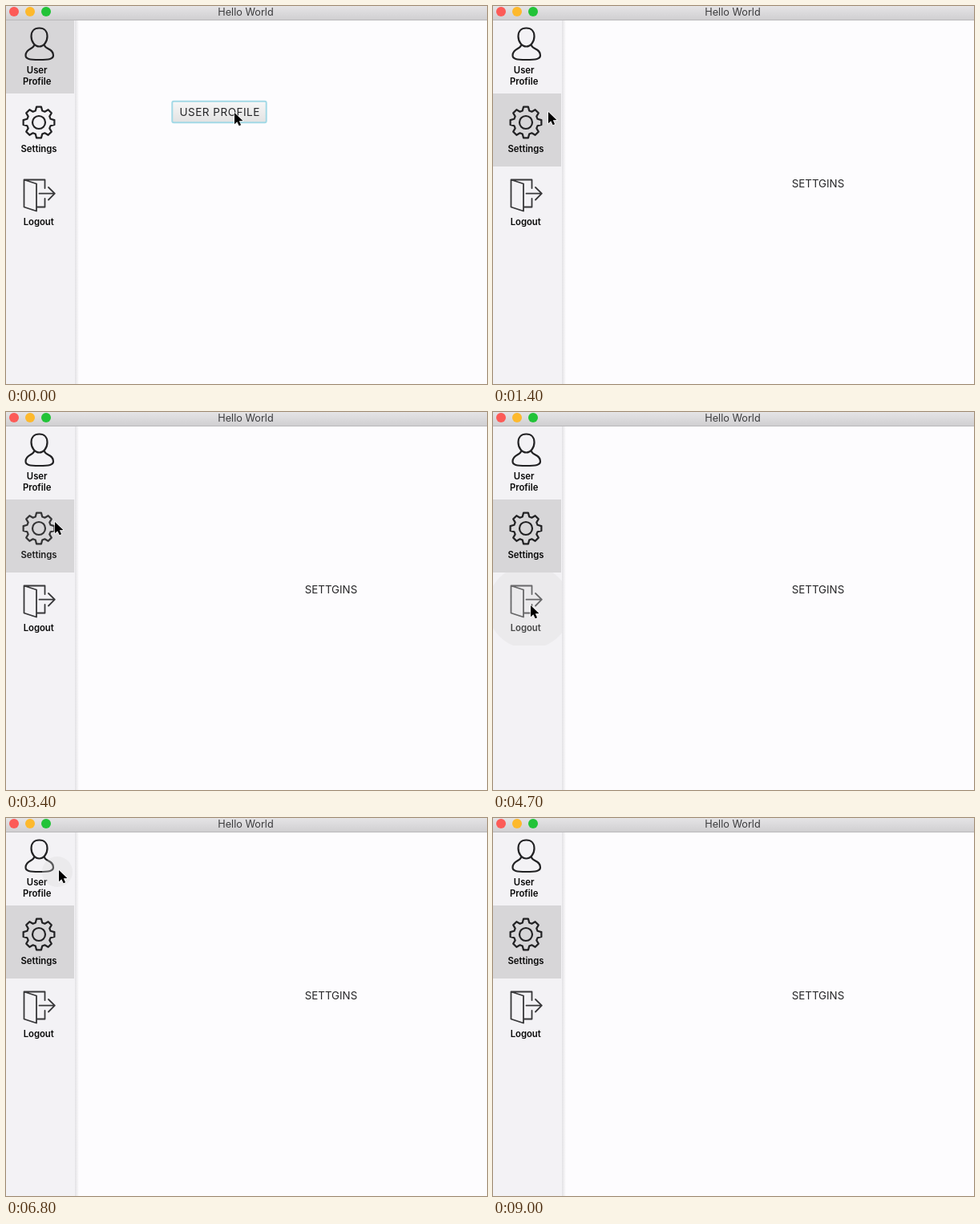
Animation of 600x471 px, one loop 9600 ms. Source, as an HTML page:

```html
<!DOCTYPE html>
<html lang="en">
<head>
<meta charset="utf-8">
<title>Hello World</title>
<style>
  html, body { margin: 0; width: 100%; height: 100%; overflow: hidden; background: #fdfcfe; }
  #stage { display: block; width: 600px; height: 471px; }
  text { font-family: Inter, "Open Sans", sans-serif; text-anchor: middle; fill: #262628; }
  .label { font-size: 11.3px; font-weight: 600; fill: #080808; }
  .icon { fill: none; stroke: #222224; stroke-width: 2.2; stroke-linejoin: round; stroke-linecap: round; }
</style>
</head>
<body>
<svg id="stage" viewBox="0 0 600 471">
  <defs>
    <linearGradient id="bar" x2="0" y2="1">
      <stop stop-color="#e5e4e6"/><stop offset="1" stop-color="#cfced0"/>
    </linearGradient>
    <linearGradient id="shade">
      <stop stop-color="#e2e1e4"/><stop offset="1" stop-color="#fdfcfe"/>
    </linearGradient>
    <linearGradient id="face" x2="0" y2="1">
      <stop stop-color="#f7f7f7"/><stop offset="1" stop-color="#e2e2e2"/>
    </linearGradient>
  </defs>
  <rect width="600" height="471" fill="#fdfcfe"/>

  <g id="profile">
    <rect x="207.3" y="118.8" width="117.4" height="26.4" rx="2" fill="url(#face)" stroke="#a3d9e6" stroke-width="2"/>
    <text x="266.7" y="136.6" font-size="13.6" letter-spacing=".45">USER PROFILE</text>
  </g>
  <text id="settings" x="405.5" y="225.6" font-size="13.3">SETTGINS</text>

  <rect y="18" width="86" height="453" fill="#f3f2f5"/>
  <rect x="86" y="18" width="5" height="453" fill="url(#shade)"/>
  <rect id="selected" width="85" height="91" fill="#d7d6d8"/>

  <g class="icon">
    <path d="M41.5 27.500c-6.600 0-10 4.300-10 10.300 0 7 4.500 12.700 10 12.700s10-5.700 10-12.700c0-6-3.400-10.300-10-10.300z"/>
    <path d="M35 49C34 54 24.500 53 24.500 61.500C24.500 66 29 67 41.500 67S59 66 59 61.500C59 53 49 54 48 49"/>
    <path id="gear"/>
    <circle cx="41" cy="145" r="8"/>
    <path stroke="#38383a" stroke-width="1.800" d="M22.500 216.500L38 221.500V255.500L22.500 250.500ZM22.500 216.500H48.500V227M48.500 240V250.500H38M41.500 233.700H60.500M53 226L60.800 233.700L53 241.500"/>
  </g>
  <text class="label" x="38.700" y="84">User</text>
  <text class="label" x="38.700" y="98">Profile</text>
  <text class="label" x="41" y="182">Settings</text>
  <text class="label" x="40.700" y="273">Logout</text>
  <svg id="row" width="86" height="91"><circle id="ripple" fill="#d8d8d8"/></svg>

  <rect width="600" height="18" fill="url(#bar)"/>
  <rect y="17" width="600" height="1" fill="#bab9bb"/>
  <circle cx="10" cy="7" r="6" fill="#fc5b57"/>
  <circle cx="30" cy="7" r="6" fill="#fdb92d"/>
  <circle cx="50" cy="7" r="6" fill="#22c338"/>
  <text x="299" y="12" font-size="12.700" style="fill:#3c3c3e">Hello World</text>

  <path id="cursor" d="M0 0V14.200L3.300 11.200L5.700 16.300L8.100 15.200L5.800 10.200L10.400 10Z" stroke="#fff" stroke-width="1.300" paint-order="stroke"/>
</svg>
<script>
const $ = id => document.getElementById(id);
const set = (id, attrs) => {
  for (const key in attrs) $(id).setAttribute(key, attrs[key]);
};
const clamp = v => Math.max(0, Math.min(1, v));
const LOOP = 9600, STEP = 100, TOP = 18, ROW = 91, MOVE = 400, LOGOUT = 2;

// Pointer stops: arrival time, x, y
const stops = [
  [0, 285, 133], [600, 69, 132], [2200, 66, 66], [3000, 61, 137], [3800, 47, 241],
  [6000, 61, 137], [6800, 66, 65], [7300, 66, 140], [7700, 63, 238], [8200, 60, 60], [8800, 42, 240]
];
const clickTimes = [900, 2200, 3000, 4600, 6800, 7300];

// Each move eases in and out and ends at its stop's arrival time.
function pointer(t) {
  let [, x, y] = stops[0];
  for (const [arrival, nextX, nextY] of stops) {
    const p = clamp((t - arrival + MOVE) / MOVE), k = p * p * (3 - 2 * p);
    x += (nextX - x) * k;
    y += (nextY - y) * k;
  }
  return [x, y];
}

const clicks = clickTimes.map(time => {
  const [x, y] = pointer(time);
  return { time, x, y, row: Math.floor((y - TOP) / ROW) };
});
const idle = { time: -LOOP, x: 0, y: TOP, row: 0 };
const lastClick = (t, test = () => true) => clicks.filter(c => c.time <= t && test(c)).pop() || idle;

function gearPath(cx, cy) {
  const points = [];
  for (let i = 0; i < 8; i++)
    for (const [turn, r] of [[-.28, 15.2], [-.15, 19.6], [.15, 19.6], [.28, 15.2]]) {
      const a = i * Math.PI / 4 + turn;
      points.push([cx + r * Math.sin(a), cy - r * Math.cos(a)]);
    }
  return "M" + points.join("L") + "Z";
}

function draw(now) {
  const t = Math.floor(now % LOOP / STEP) * STEP;
  const [x, y] = pointer(t);
  set("cursor", { transform: `translate(${x} ${y})`, visibility: t < 8900 ? "visible" : "hidden" });

  // The page changes just after a click; logout only ripples.
  const { time, row: page } = lastClick(t - 100, c => c.row !== LOGOUT);
  const p = clamp((t - 100 - time) / 300);
  set("selected", { y: TOP + page * ROW });
  ["profile", "settings"].forEach((id, i) => set(id, {
    opacity: i === page ? p : 0,
    transform: `translate(${(i ? 185 : 100) * (1 - p) ** 2} 0)`
  }));

  const click = lastClick(t), age = t - click.time, top = TOP + click.row * ROW;
  set("row", { y: top });
  set("ripple", {
    cx: click.x - 2, cy: click.y - top + 2,
    r: 19 + age * .33, opacity: .3 * clamp((500 - age) / 300)
  });
}

function frame() {
  draw(performance.now());
  requestAnimationFrame(frame);
}

set("gear", { d: gearPath(41, 145) });
frame();
</script>
</body>
</html>
```
